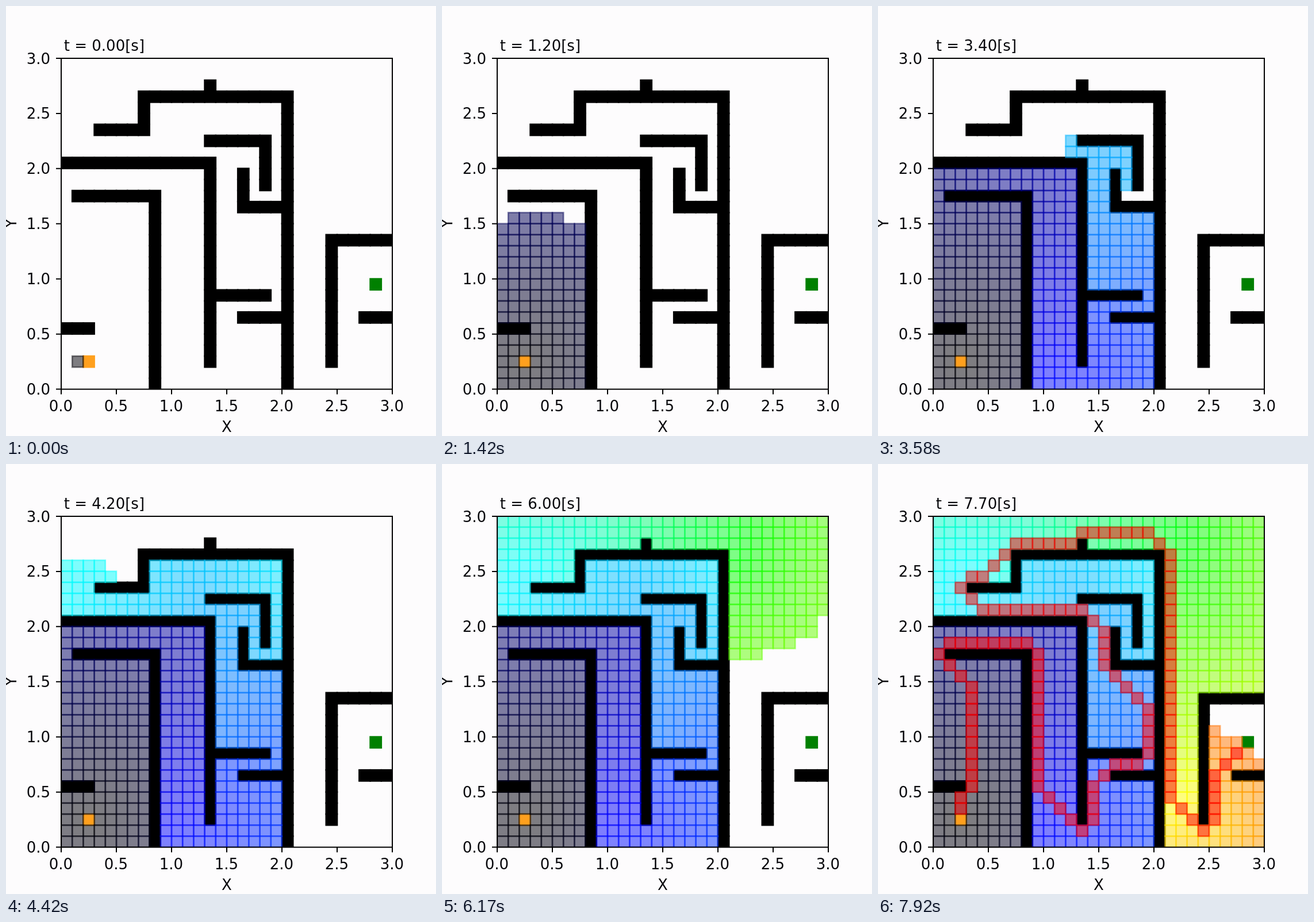
These frames come from a looping animation (748 by 748 pixels, 8000 ms). An HTML page:

```html
<!DOCTYPE html>
<html lang="en">
<head>
<meta charset="utf-8">
<title>Grid search</title>
<style>
  html, body { margin: 0; width: 100%; height: 100%; overflow: hidden; background: #fdfcfd; }
  svg { display: block; width: 100vw; height: 100vh; }
  text { font: 26px "DejaVu Sans", sans-serif; fill: #08080c; white-space: pre; }
</style>
</head>
<body>
<svg viewBox="0 0 748 748">
  <defs><clipPath id="plot"><rect x="96" y="91" width="576" height="575.6"/></clipPath></defs>
  <rect width="748" height="748" fill="#fdfcfd"/>
  <g clip-path="url(#plot)">
    <g id="walls"></g>
    <g id="cells"></g>
    <g id="path"></g>
  </g>
  <g id="axes"></g>
  <text id="title" x="100.8" y="78"></text>
</svg>
<script>
const N = 30, CELL = 19.2, LEFT = 96, RIGHT = 672, TOP = 91, BOTTOM = 666.6;
const LOOP = 8000, FPS = 12, PER_STEP = 10;
const START = { x: 2, y: 2 }, GOAL = { x: 28, y: 9 };
// Each wall: first cell, then runs of cells across (h) and up (v).
const WALLS = [
  '0 5 h2', '1 17 h7 v-17', '0 20 h13 v-18', '14 8 h4', '16 6 h3', '3 23 h4 v3 h13 v-26',
  '13 27', '13 22 h5 v-4', '16 19 v-3 h3', '24 2 v11 h5', '27 6 h2'
];

const $ = id => document.getElementById(id);
const idOf = ({ x, y }) => x * N + y;
const clamp01 = v => Math.min(1, Math.max(0, v));

function add(parent, tag, attrs, text) {
  const el = document.createElementNS('http://www.w3.org/2000/svg', tag);
  for (const key in attrs) el.setAttribute(key, attrs[key]);
  if (text !== undefined) el.textContent = text;
  parent.appendChild(el);
  return el;
}

function box(parent, { x, y }, color, alpha = 1) {
  return add(parent, 'rect', {
    x: LEFT + x * CELL, y: BOTTOM - (y + 1) * CELL, width: CELL, height: CELL,
    fill: color, stroke: color, 'stroke-width': 2.6,
    'fill-opacity': alpha, 'stroke-opacity': alpha
  });
}

// black, blue, cyan, green, yellow, orange with rising cost
function costColor(cost) {
  const u = cost / 420;
  const rgb = [2 * u - 5, Math.min(u - 1, 6.25 - 1.75 * u), Math.min(u, 5 - 2 * u)];
  return `rgb(${rgb.map(v => Math.round(255 * clamp01(v)))})`;
}

function wallCells(spec) {
  const [x0, y0, ...runs] = spec.split(' ');
  let x = +x0, y = +y0;
  const out = [{ x, y }];
  for (const run of runs) {
    const len = +run.slice(1), dir = Math.sign(len);
    for (let i = 0; i < Math.abs(len); i++) {
      if (run[0] === 'h') x += dir; else y += dir;
      out.push({ x, y });
    }
  }
  return out;
}

// Dijkstra with eight neighbours, costs 10 and 14; ties go first in, first out.
function search(walls) {
  const blocked = new Set(walls.map(idOf));
  const nodes = new Map(), open = new Set(), order = [];
  const first = { ...START, cost: 0 };
  nodes.set(idOf(first), first);
  open.add(first);
  while (open.size) {
    let node = null;
    for (const n of open) if (!node || n.cost < node.cost) node = n;
    if (idOf(node) === idOf(GOAL)) return { order, goal: node };
    open.delete(node);
    if (node !== first) order.push(node);
    for (let dx = -1; dx <= 1; dx++) for (let dy = -1; dy <= 1; dy++) {
      const x = node.x + dx, y = node.y + dy, id = idOf({ x, y });
      if (x < 0 || y < 0 || x >= N || y >= N || blocked.has(id)) continue;
      const cost = node.cost + (dx && dy ? 14 : 10), known = nodes.get(id);
      if (known && known.cost <= cost) continue;
      const next = Object.assign(known || { x, y }, { cost, parent: node });
      nodes.set(id, next);
      open.add(next);
    }
  }
}

function drawAxes() {
  const axes = $('axes'), line = { stroke: '#000', 'stroke-width': 2, fill: 'none' };
  const middle = { 'text-anchor': 'middle' };
  add(axes, 'rect', { x: LEFT, y: TOP, width: RIGHT - LEFT, height: BOTTOM - TOP, ...line });
  for (let i = 0; i <= 6; i++) {
    const x = LEFT + i * 5 * CELL, y = BOTTOM - i / 6 * (BOTTOM - TOP), label = (i / 2).toFixed(1);
    add(axes, 'path', { d: `M${x} ${BOTTOM}v9M${LEFT} ${y}h-9`, ...line });
    add(axes, 'text', { x: x - 0.5, y: 705, ...middle }, label);
    add(axes, 'text', { x: 77, y: y + 9.5, 'text-anchor': 'end' }, label);
  }
  add(axes, 'text', { x: 384, y: 741, ...middle }, 'X');
  add(axes, 'text', { transform: 'translate(18 378) rotate(-90)', ...middle }, 'Y');
}

const walls = WALLS.flatMap(wallCells);
const { order, goal } = search(walls);
walls.forEach(w => box($('walls'), w, '#000'));
box($('walls'), START, '#ffa01e');
box($('walls'), GOAL, '#008000');
const cells = order.map(n => box($('cells'), n, costColor(n.cost), 0.5));
for (let n = goal.parent; n.parent; n = n.parent) box($('path'), n, '#f00', 0.5);
drawAxes();

let shown = -1;
function render(ms) {
  const tick = Math.floor((ms % LOOP + 4) * FPS / 1000);
  // ten pictures a second on a twelve-a-second clock
  const step = Math.max(0, Math.ceil(tick * 5 / 6 - 0.5 - 1e-9) - 2);
  if (step === shown) return;
  shown = step;
  const count = step * PER_STEP + 1;
  cells.forEach((c, i) => { c.style.display = i < count ? '' : 'none'; });
  $('path').style.display = count > cells.length ? '' : 'none';
  $('title').textContent = `t = ${(step / 10).toFixed(2)}[s]`;
}

const begin = performance.now();
function loop() {
  render(performance.now() - begin);
  requestAnimationFrame(loop);
}
loop();
</script>
</body>
</html>
```
